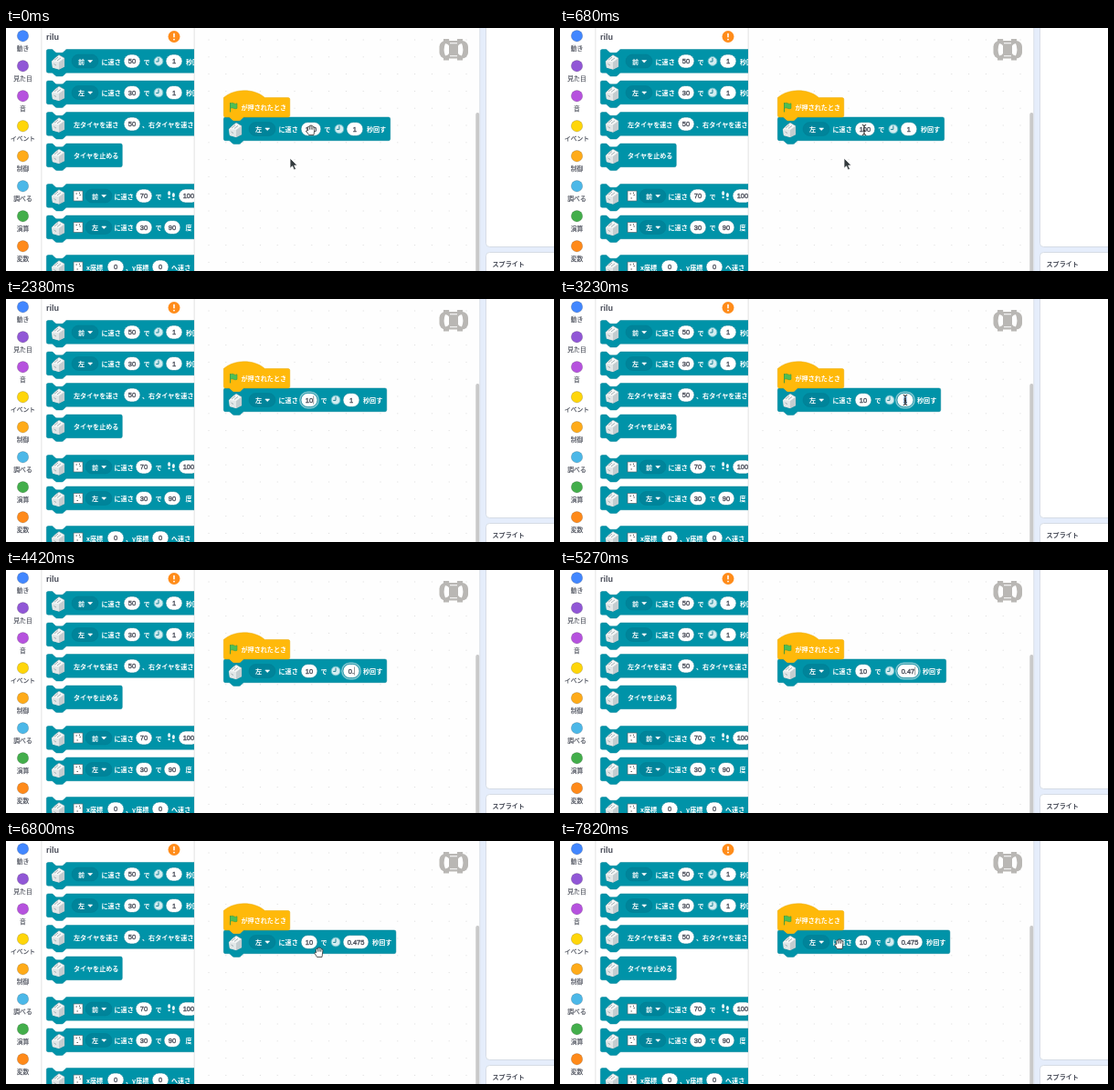
Recreate the animation shown at these times as an HTML page. Size 600 by 267 pixels, loop 7.99 s.

```html
<!DOCTYPE html>
<html lang="ja">
<head>
<meta charset="utf-8">
<style>
  html, body { margin: 0; width: 100%; height: 100%; overflow: hidden; background: #fff; }
  svg { display: block; width: 100%; height: 100%; }
  text { font: 700 7.1px "Noto Sans CJK JP", "Noto Sans CJK", sans-serif; dominant-baseline: central; fill: #484c58; }
  .num { font: 7.5px "Liberation Sans", sans-serif; text-anchor: middle; stroke: #484c58; stroke-width: .35; }
  .label { font-size: 6.8px; font-weight: 400; text-anchor: middle; stroke: #484c58; stroke-width: .15; }
  .word { fill: #fff; }
  .mid { text-anchor: middle; }
</style>
</head>
<body>
<svg viewBox="0 0 600 267" preserveAspectRatio="none">
  <defs>
    <pattern id="grid" x="212.6" y="3.6" width="18.8" height="18.8" patternUnits="userSpaceOnUse">
      <circle cx="9.4" cy="9.4" r=".6" fill="#d6d6d6"/>
    </pattern>
    <clipPath id="palette"><path d="M39 0H206V267H39z"/></clipPath>
    <g id="cube" stroke-linejoin="round">
      <path d="M-7-1L-3-5 1-8 7-4.5 7 5 1 8-6 6z" fill="#f4f6f6" stroke="#6f979f" stroke-width=".5"/>
      <path d="M1 0L7-4.5 7 5 1 8z" fill="#c3cdd0"/>
      <path d="M-7-1L1 0 1 8-6 6z" fill="#e2e7e8"/>
      <path d="M-4-2.2L0-5.4M-1-1.6L3-4.6M-4.5 2L-2 3.6" stroke="#93a3a8" stroke-width=".8" fill="none"/>
    </g>
    <g id="clock">
      <circle r="4.9" fill="#d3ecf0" stroke="#5cb9c6" stroke-width=".9"/>
      <path d="M0-3.5V.4H-2.8" fill="none" stroke="#1d8296" stroke-width="1"/>
    </g>
    <g id="mat">
      <path d="M-5-5.5H5V5.5H-5z" fill="#fff" stroke="#596b70" stroke-width=".7"/>
      <path d="M-2.5-2.5h1.4M1.5-1h1.4M-1.5 2.5h1.4M1-3.2h1" stroke="#555" stroke-width="1.2"/>
    </g>
    <g id="feet" fill="#e8f6f8">
      <ellipse cx="-2.4" cy="-2" rx="1.5" ry="2.5"/><circle cx="-2.4" cy="2.6" r="1.2"/>
      <ellipse cx="2.4" cy="0" rx="1.5" ry="2.5"/><circle cx="2.4" cy="4.6" r="1.2"/>
    </g>
    <path id="arrow" d="M0 0V11.2L2.6 8.8 4.4 13 6.5 12.1 4.7 8.1H8z" fill="#333a3d" stroke="#fff" stroke-width=".8"/>
    <path id="beam" d="M-2.2-5.5Q0-5.5 0-4V4Q0 5.5-2.2 5.5M2.2-5.5Q0-5.5 0-4M0 4Q0 5.5 2.2 5.5M-1.2.8H1.2" fill="none" stroke="#222" stroke-width="1"/>
    <path id="hand" d="M-2.5 5.5L-5 1.5Q-5.4-.2-3.2.5L-3.8-3Q-3-4.6-1.8-3.2-1.6-5.8 0-4.8 1.4-5.6 2-3.4 4-4 3.9-1.5L3 5.5z M-1.8-3.2L-1.3-.3M0-4.8L.3-.5M2-3.4L1.8-.3" fill="#fff" stroke="#333" stroke-width=".8" stroke-linejoin="round"/>
  </defs>
  <g id="scene"></g>
  <g id="script"></g>
  <g id="pointer"></g>
</svg>
<script>
const LOOP = 7990, TICK = 170, UNIT = .47;
const TEAL = ['#0093a8', '#008296'], GOLD = ['#ffb90a', '#e8a800'];
const byId = id => document.getElementById(id);

const use = (id, x, y) => `<use href="#${id}" x="${x}" y="${y}"/>`;
const rect = (x, y, w, h, fill, r = 0, extra = '') =>
  `<rect x="${x}" y="${y}" width="${w}" height="${h}" rx="${r}" fill="${fill}" ${extra}/>`;
const word = (x, y, s, cls = '') => `<text class="word ${cls}" x="${x}" y="${y}">${s}</text>`;

const TOP_NOTCH = 'H12c2 0 3 1 4 2l4 4c1 1 2 2 4 2h12c2 0 3-1 4-2l4-4c1-1 2-2 4-2';
const BOTTOM_NOTCH = 'H48c-2 0-3 1-4 2l-4 4c-1 1-2 2-4 2h-12c-2 0-3-1-4-2l-4-4c-1-1-2-2-4-2H4a4 4 0 0 1-4-4z';

function shape(x, y, width, height, [fill, edge], hat) {
  const w = width / UNIT, h = height / UNIT;
  const top = hat ? 'M0 0c25-22 71-22 96 0' : 'M0 4A4 4 0 0 1 4 0' + TOP_NOTCH;
  return `<path transform="translate(${x} ${y}) scale(${UNIT})" fill="${fill}" stroke="${edge}" stroke-width="1"
    d="${top}H${w - 4}a4 4 0 0 1 4 4V${h - 4}a4 4 0 0 1-4 4${BOTTOM_NOTCH}"/>`;
}

const textWidth = s => [...s].reduce((sum, c) => sum + (c === '.' ? 2 : 4.2), 0);
const fieldWidth = s => Math.max(18, textWidth(s) + 9.3);

function field(x, cy, s, mode = '') {
  const w = fieldWidth(s), c = x + w / 2, tw = textWidth(s);
  const halo = mode && rect(x - 1.1, cy - 8.6, w + 2.2, 17.2, 'none', 8.6, 'stroke="#7fc6d1" stroke-width="1.7"');
  const mark = mode === 'select' ? rect(c - tw / 2, cy - 4.5, tw, 9, '#b3d4f5') : '';
  const caret = mode === 'caret' ? rect(c + tw / 2 + .3, cy - 4.5, .6, 9, '#555') : '';
  return halo + rect(x, cy - 7.5, w, 15, '#fff', 7.5, 'stroke="#007c90" stroke-width=".6"') +
    mark + `<text class="num" x="${c}" y="${cy + .2}">${s}</text>` + caret;
}

const menu = (x, cy, s) =>
  rect(x, cy - 7.5, 29, 15, '#00849a', 7.5, 'stroke="#007c90" stroke-width=".5"') + word(x + 10.5, cy, s, 'mid') +
  `<path d="M${x + 17.8} ${cy - 1}h4.8l-2.4 2.6z" fill="#fff" stroke="#fff" stroke-width=".6" stroke-linejoin="round"/>`;

const base = (x, y, width) => shape(x + .3, y, width - .5, 25.7, TEAL) + use('cube', x + 13, y + 14);

function turnBlock(x, y, dir, speed, secs, tail, focus = 0, mode = '') {
  const cy = y + 13, a = x + 85, de = a + fieldWidth(speed) + 7, b = de + 21, end = b + fieldWidth(secs) + 4;
  return base(x, y, end + 26 - x) + menu(x + 28, cy, dir) + word(x + 60.5, cy, 'に速さ') +
    field(a, cy, speed, focus === 1 ? mode : '') + word(de, cy, 'で', 'mid') +
    use('clock', de + 13, cy) + field(b, cy, secs, focus === 2 ? mode : '') + word(end, cy, tail);
}

function drawScene() {
  const categories = [
    ['動き', '#4287ff'], ['見た目', '#9157d6'], ['音', '#b652de'], ['イベント', '#ffd60a'],
    ['制御', '#ffab19'], ['調べる', '#4cb8e8'], ['演算', '#43ae4b'], ['変数', '#ff8a1a']];
  const sidebar = categories.map(([name, color], i) =>
    `<circle cx="18.5" cy="${8.7 + i * 33}" r="6.2" fill="${color}" stroke="#000" stroke-opacity=".2" stroke-width=".8"/>
     <text class="label" x="18.5" y="${22 + i * 33}">${name}</text>`).join('');

  const wide = 190, x = 44;
  const blocks =
    turnBlock(x, 23.5, '前', '50', '1', '秒回す') +
    turnBlock(x, 58, '左', '30', '1', '秒回す') +
    base(x, 92.5, wide) + word(74, 105.5, '左タイヤを速さ') + field(129, 105.5, '50') + word(149, 105.5, '、右タイヤを速さ') +
    base(x, 127, 83.5) + word(74, 140, 'タイヤを止める') +
    base(x, 171.5, wide) + use('mat', 79, 184.5) + menu(87, 184.5, '前') + word(118.5, 184.5, 'に速さ') +
    field(142, 184.5, '70') + word(167, 184.5, 'で', 'mid') + use('feet', 181, 183.5) + field(189, 184.5, '100') +
    base(x, 206, wide) + use('mat', 79, 219) + menu(87, 219, '左') + word(118.5, 219, 'に速さ') +
    field(142, 219, '30') + word(167, 219, 'で', 'mid') + field(173, 219, '90') + word(200, 219, '度', 'mid') +
    base(x, 249.5, wide) + use('mat', 79, 262.5) + word(88, 262.5, 'x座標') + field(111, 262.5, '0') +
    word(131, 262.5, '、y座標') + field(160, 262.5, '0') + word(181, 262.5, 'へ速さ');

  const car = `<g fill="#b9b7b4"><rect x="474.5" y="14" width="31.5" height="19.5" rx="6.5"/>
    <path d="M479 12h6v3h-6zM494 12h6v3h-6zM479 32.5h6v3h-6zM494 32.5h6v3h-6z"/>
    <g fill="#fff"><path d="M481 17q3.500.7 4 2.500v8.500q-.5 1.800-4 2.500-2.800-6.700 0-13.500zM499 17q-3.500.7-4 2.500v8.500q.5 1.800 4 2.500 2.800-6.700 0-13.500z"/>
    <path d="M486 16.300h8v.9h-8zM486 30.300h8v.9h-8z"/></g></g>`;

  byId('scene').innerHTML =
    rect(0, 0, 600, 267, '#fff') + sidebar + rect(38.5, 0, .8, 267, '#dcdcdc') +
    rect(206, 0, 314, 267, '#fefefe') + rect(206, 0, 314, 267, 'url(#grid)') + rect(205.7, 0, .8, 267, '#d9d9d9') +
    `<g clip-path="url(#palette)">${blocks}</g>
     <text x="44" y="9.5" style="font:bold 9px 'Liberation Sans',sans-serif">rilu</text>
     <circle cx="184" cy="9.5" r="6.5" fill="#ff8c1a"/>` +
    rect(183.2, 5.8, 1.6, 4.7, '#fff', .7) + `<circle cx="184" cy="12.6" r=".95" fill="#fff"/>` + car +
    rect(514.3, 93, 4, 180, '#c9c9c9', 2) +
    rect(518.8, 0, 82, 267, '#e5edfb') + rect(518.5, 0, .7, 267, '#d0d6e0') +
    rect(525.5, -10, 90, 250.5, '#fff', 4, 'stroke="#d0d6e0" stroke-width=".8"') +
    rect(525.5, 246.5, 90, 40, '#fff', 4, 'stroke="#d0d6e0" stroke-width=".8"') +
    `<text x="532.5" y="258.5">スプライト</text>`;
}

// time, speed, seconds, focused field, field mode
const edits = [
  [0, '100', '1', 0, ''], [1020, '100', '1', 1, 'select'], [1700, '1', '1', 1, 'caret'],
  [2040, '10', '1', 1, 'caret'], [3060, '10', '1', 2, 'select'], [3910, '10', '0', 2, 'caret'],
  [4250, '10', '0.', 2, 'caret'], [4760, '10', '0.4', 2, 'caret'], [5100, '10', '0.47', 2, 'caret'],
  [5440, '10', '0.475', 2, 'caret'], [5950, '10', '0.475', 2, 'plain'], [6460, '10', '0.475', 0, '']];

// time, cursor, x, y
const moves = [
  [0, 'hand', 334, 112], [340, 'beam', 333, 112], [1190, '', 333, 112], [2720, 'beam', 378, 111],
  [3570, '', 378, 111], [5780, 'arrow', 381, 136], [6460, 'arrow', 381, 136],
  [6800, 'hand', 343, 122], [7140, 'hand', 306, 113], [LOOP, 'hand', 306, 113]];

const stepAt = (table, t) => table.findLastIndex(row => row[0] <= t);

function drawScript([, speed, secs, focus, mode]) {
  byId('script').innerHTML =
    turnBlock(238, 98, '左', speed, secs, '秒回す', focus, mode) +
    shape(238.3, 76.5, 72.5, 21.5, GOLD, true) +
    `<path d="M245.5 82.5v9.5" stroke="#45993d" stroke-width="1" stroke-linecap="round"/>
     <path d="M245.5 82.8q2.3-1.2 4 0t3.5 0v5.5q-2 1-3.7 0t-3.8 0z" fill="#4cbf56" stroke="#45993d" stroke-width=".6"/>` +
    word(257.5, 87.2, 'が押されたとき');
}

function drawPointer(t) {
  const i = stepAt(moves, t), [start, kind, x, y] = moves[i], [end, , x2, y2] = moves[i + 1];
  const k = (t - start) / (end - start);
  byId('pointer').innerHTML =
    (t < 1190 ? use('arrow', 311, 143) : '') +
    (kind ? use(kind, x + (x2 - x) * k, y + (y2 - y) * k) : '');
}

let lastTick = -1;
function frame() {
  const t = Math.floor(performance.now() % LOOP / TICK) * TICK;
  if (t !== lastTick) {
    drawScript(edits[stepAt(edits, t)]);
    drawPointer(t);
    lastTick = t;
  }
  requestAnimationFrame(frame);
}

drawScene();
frame();
</script>
</body>
</html>
```
